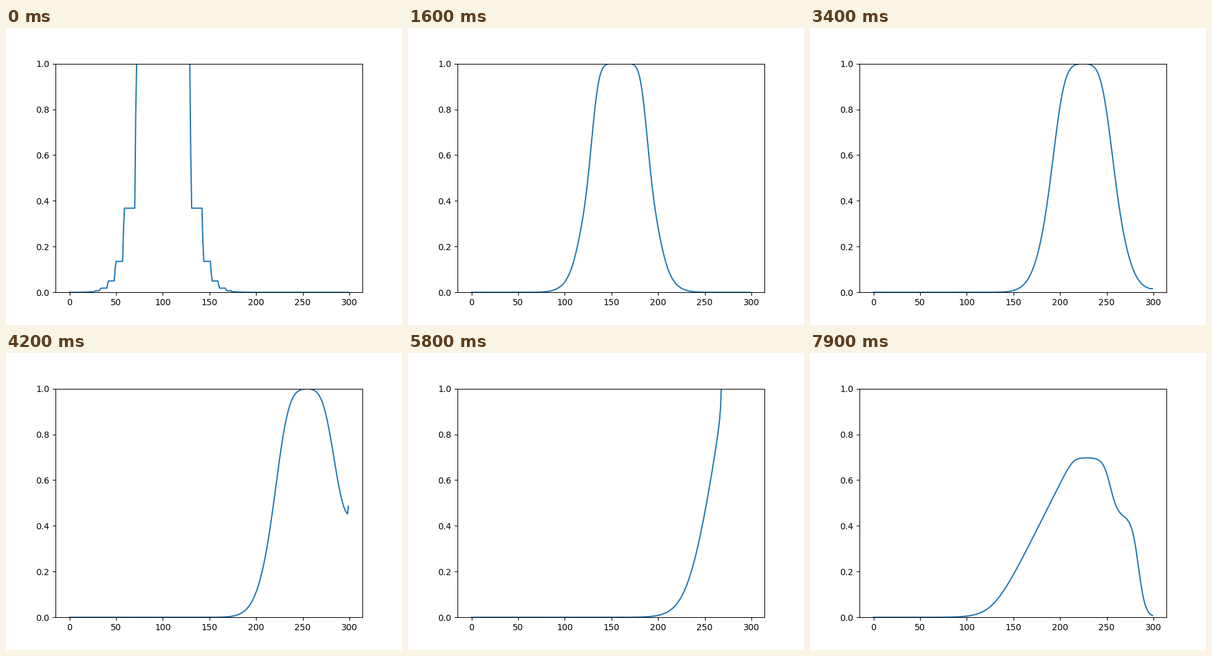
Write a matplotlib script that moves like this. It is 640x480 px and loops after 8 s.

```python
import numpy as np
import matplotlib.pyplot as plt
from matplotlib.animation import FuncAnimation

CELLS, FRAMES = 300, 80
STEPS, COURANT = 10, 0.365      # upwind steps per frame
TURN, LEAVE, LAST = 50, 66, 79  # frames: squeeze starts, rebound starts, end
PILE_UP = 1.08                  # excess density in the cell at the wall
cells = np.arange(CELLS)
edges = np.arange(CELLS + 1) - 0.5
fine = np.linspace(edges[0], edges[-1], 6001)


def softplus(x, width):
    return width * np.logaddexp(0, x / width)


def sigmoid(x):
    return 0.5 + 0.5 * np.tanh(x / 2)


def hermite(a, va, b, vb, t):
    return (a * (2 * t**3 - 3 * t**2 + 1) + va * (t**3 - 2 * t**2 + t)
            + b * (3 * t**2 - 2 * t**3) + vb * (t**3 - t**2))


def approach():
    """Upwind advection of a stepped bell, mirrored at the right wall."""
    i = np.arange(2 * CELLS)
    f = np.exp(-((i - 100) ** 2 // 900).astype(float))
    rows = []
    for step in range(TURN * STEPS + 1):
        f[1:] -= COURANT * (f[1:] - f[:-1])
        if step % STEPS == 0:
            rho = f[:CELLS] + f[:CELLS - 1:-1]
            rho[-1] *= PILE_UP
            rows.append(rho)
    return rows


def profile(foot, slope, bend, crest, *drops):
    """A ramp that levels off at a crest, then steps down to the wall."""
    ramp = slope * softplus(fine - foot, bend)
    rho = crest - softplus(crest - ramp, 0.027)
    for center, depth, width in drops:
        rho -= depth * sigmoid((fine - center) / width)
    return np.maximum(rho, 1e-7)


def mass_curve(rho):
    mass = np.append(0, np.cumsum((rho[1:] + rho[:-1]) / 2 * np.diff(fine)))
    return mass / mass[-1], mass[-1]


m0, total0 = mass_curve(profile(195.7, 0.0141, 11.5, 1.13, (295, 0.3, 1.2)))
m1, total1 = mass_curve(profile(128.2, 0.00815, 10.3, 0.698,
                                (254, 0.257, 4), (284, 0.441, 3.7)))
parcels = np.union1d(m0, m1)
start, stop = (np.interp(parcels, m, fine) for m in (m0, m1))


def rebound(n):
    """Every parcel of mass drifts away from the wall at its own speed."""
    s = (n - LEAVE) / (LAST - LEAVE)
    x = start + s * (stop - start)
    rho = np.diff(np.interp(edges, x, parcels)) * (total0 + s * (total1 - total0))
    rho[-1] *= PILE_UP
    return rho


levels = np.append(np.geomspace(2e-4, 0.1, 25), np.linspace(0.12, 1.04, 47))


def contour(rho):
    """Where the left flank reaches each level."""
    top = np.argmax(rho) + 1
    return np.interp(levels, np.maximum.accumulate(rho[:top]), cells[:top])


early = approach()
xa, xb = contour(early[TURN]), contour(rebound(LEAVE))
va = xa - contour(early[TURN - 1])
vb = contour(rebound(LEAVE + 1)) - xb


def squeeze(n):
    """The left flank slows down and turns back; the crest is out of view."""
    span = LEAVE - TURN
    x = hermite(xa, va * span, xb, vb * span, (n - TURN) / span)
    rho = np.interp(cells, np.maximum.accumulate(x), levels, left=0)
    return np.minimum(rho, rebound(LEAVE) + 0.1 * (LEAVE - n))


def density(n):
    if n <= TURN:
        return early[n]
    return squeeze(n) if n < LEAVE else rebound(n)


fig, ax = plt.subplots(figsize=(6.4, 4.8), dpi=100)
line, = ax.plot(cells, density(0))
ax.set_ylim(0, 1)


def update(n):
    line.set_ydata(density(n))
    return line,


anim = FuncAnimation(fig, update, frames=FRAMES, interval=100,
                     repeat=True, repeat_delay=0)
plt.show()
```
